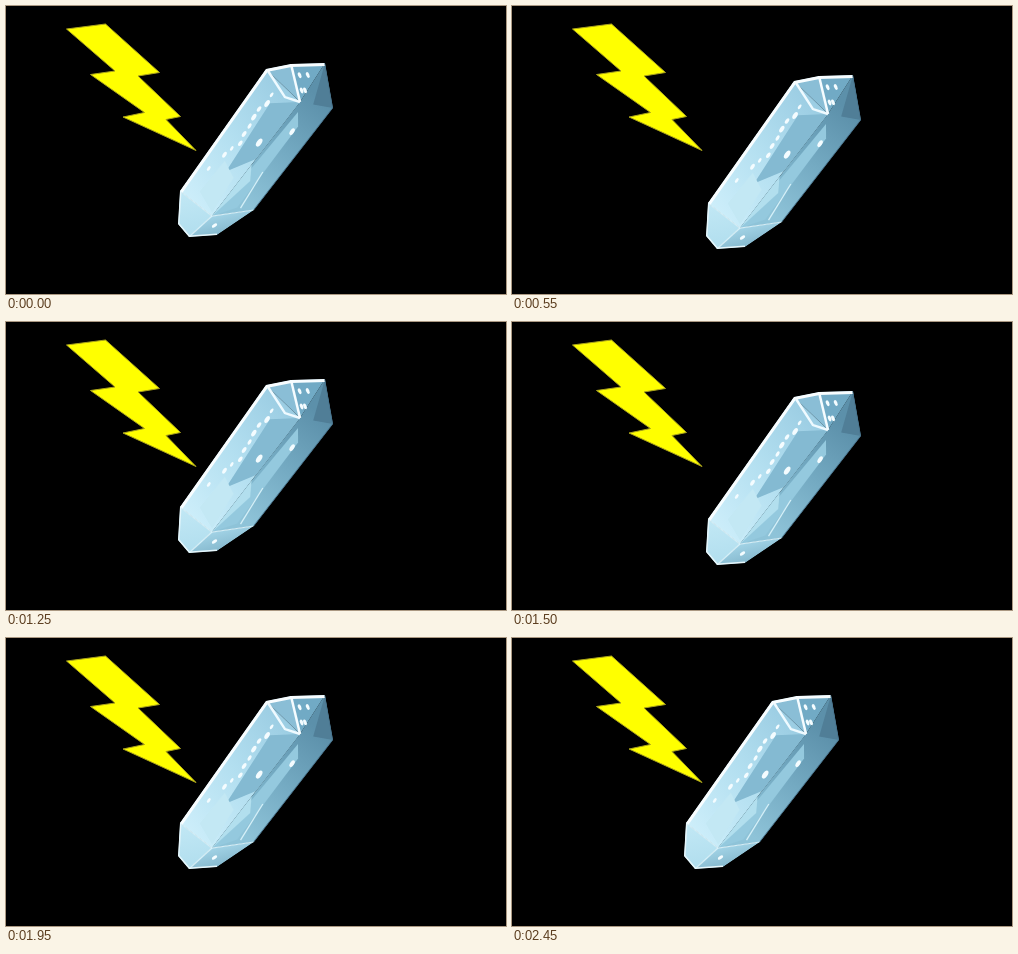
Recreate the animation shown at these times as an HTML page with a canvas. Size 500 by 288 pixels, loop 2500 ms.

```html
<!DOCTYPE html>
<html lang="en">
<head>
<meta charset="utf-8">
<title>Shaking crystal</title>
<style>
  html, body { margin: 0; width: 100%; height: 100%; overflow: hidden; background: #000; }
  canvas { display: block; }
</style>
</head>
<body>
<canvas id="stage" width="500" height="288"></canvas>
<script>
const ctx = document.getElementById('stage').getContext('2d');
const LOOP = 2500, TICK = 50;
const PAUSE_EVERY = 4.3; // ticks between two pauses of the shake
const SHIFT = { x: 22, y: 12 };

const pt = (x, y) => ({ x, y });
const mix = (a, b, t) => pt(a.x + (b.x - a.x) * t, a.y + (b.y - a.y) * t);

// Corners of the crystal
const left = pt(174, 185), shoulder = pt(260, 63), crest = pt(285, 58);
const peak = pt(319, 57), right = pt(327, 102), apex = pt(294, 96);
const lowRight = pt(248, 204), heel = pt(211, 229), toe = pt(183, 231);
const lowLeft = pt(172, 218), ridge = pt(206, 210);

// Positions on the two long faces: u runs from base to tip, v from left to right
const front = (u, v) => mix(mix(left, shoulder, u), mix(ridge, apex, u), v);
const side = (u, v) => mix(mix(ridge, apex, u), mix(lowRight, right, u), v);

function trace(points) {
  ctx.beginPath();
  points.forEach(p => ctx.lineTo(p.x, p.y));
}

function fill(color, ...points) {
  trace(points);
  ctx.fillStyle = color;
  ctx.fill();
}

function stroke(color, width, ...points) {
  trace(points);
  ctx.lineWidth = width;
  ctx.strokeStyle = color;
  ctx.stroke();
}

function blend(a, b, ...colors) {
  const g = ctx.createLinearGradient(a.x, a.y, b.x, b.y);
  colors.forEach((c, i) => g.addColorStop(i / (colors.length - 1), c));
  return g;
}

function seeded(seed) {
  return () => (seed = (seed * 16807) % 2147483647) / 2147483647;
}

function fleck(p, size, angle) {
  ctx.beginPath();
  ctx.ellipse(p.x, p.y, size, size * 1.9, angle, 0, Math.PI * 2);
  ctx.fillStyle = '#f4fcff';
  ctx.fill();
}

function drawFlecks() {
  const random = seeded(11);
  for (let i = 0; i < 9; i++) {
    const u = 0.38 + i * 0.065;
    fleck(front(u, 0.36 + random() * 0.16), 1.3 + random() * 0.9, 0.6);
  }
  for (let i = 0; i < 4; i++) {
    fleck(mix(mix(crest, peak, 0.25 + i * 0.17), apex, 0.3 + 0.4 * (i % 2)), 1.6, -0.4);
  }
  fleck(front(0.6, 0.83), 2.4, 0.6);
  fleck(front(0.24, 0.25), 1.4, 0.6);
  fleck(side(0.75, 0.4), 2, 0.6);
  fleck(mix(ridge, heel, 0.5), 1.6, 1);
}

function drawBolt() {
  const bolt = [
    pt(60.5, 23), pt(99.5, 18), pt(153.5, 66.5), pt(132, 70), pt(174.5, 110.5), pt(160, 113.5),
    pt(190, 144.5), pt(117, 111), pt(138.5, 106.5), pt(84.5, 68.5), pt(109, 65)
  ];
  fill('#ffff00', ...bolt);
  stroke('#aaa31c', 1, ...bolt, bolt[0]);
}

function drawFaces() {
  fill(blend(left, apex, '#cdeefa', '#b3dff0', '#9acce2'), left, shoulder, apex, ridge);
  fill('#84bad2', front(0.85, 0.5), apex, front(0.5, 1), front(0.3, 0.62));
  fill('#c3e8f4', front(0.35, 0.45), front(0.3, 0.85), front(0.02, 0.95), front(0.08, 0.4));

  fill(blend(right, lowRight, '#5c90aa', '#74aac2', '#8ec3d8'), apex, peak, right, lowRight, ridge);
  fill('#94c9de', side(0.92, 0.15), side(0.8, 0.45), side(0.05, 0.5), ridge);
  fill('#b2dfee', side(0.45, 0), side(0.3, 0.3), ridge);
  stroke('#d5f0f8', 1.3, side(0.38, 0.45), side(0.04, 0.6));

  fill('#8abed6', shoulder, crest, apex);
  fill('#71aac5', crest, peak, apex);
  fill('#507e97', peak, right, mix(apex, right, 0.4));

  fill(blend(left, toe, '#c2e8f5', '#b1deee'), left, ridge, toe, lowLeft);
  fill(blend(ridge, heel, '#a2d3e6', '#86b9ce'), ridge, lowRight, heel, toe);
}

function drawEdges() {
  stroke('#eefaff', 2.5, mix(shoulder, apex, 0.06), mix(front(0.94, 0.6), apex, 0.2), apex);
  stroke('#f5fcff', 2.5, crest, apex);
  stroke('#d2ecf5', 1.2, left, ridge, lowRight);
  stroke('#d8f1f9', 1.2, ridge, toe);
  stroke('#f8fdff', 6, left, shoulder, crest, peak);
  stroke('#e6f6fb', 3, left, lowLeft, toe, heel);
  stroke('#47718a', 1.5, peak, right, lowRight);
}

function drawCrystal() {
  ctx.save();
  trace([left, shoulder, crest, peak, right, lowRight, heel, toe, lowLeft]);
  ctx.clip();
  drawFaces();
  drawEdges();
  drawFlecks();
  ctx.restore();
}

function frame(time) {
  const tick = Math.floor((time % LOOP) / TICK);
  const pauses = Math.floor((tick + 0.1) / PAUSE_EVERY);
  const flip = (tick + pauses) % 2;
  ctx.fillStyle = '#000';
  ctx.fillRect(0, 0, 500, 288);
  drawBolt();
  ctx.save();
  ctx.translate(SHIFT.x * flip, SHIFT.y * flip);
  drawCrystal();
  ctx.restore();
}

let start;
function play(now) {
  start ??= now;
  frame(Math.max(0, now - start));
  requestAnimationFrame(play);
}
frame(0);
requestAnimationFrame(play);
</script>
</body>
</html>
```
